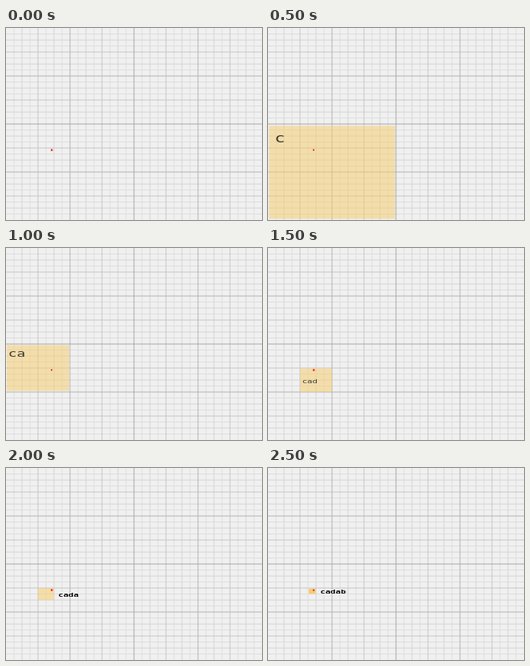
Animation, 320 px wide and 240 px high, one loop 3 s. Source, as an HTML page:

```html
<!DOCTYPE html>
<html lang="en">
<head>
<meta charset="utf-8">
<title>Geohash zoom</title>
<style>
  html, body { margin: 0; width: 100%; height: 100%; overflow: hidden; background: #f0f0f0; }
  svg { display: block; width: 100vw; height: 100vh; }
  .step {
    visibility: hidden;
    animation: show 3s step-end infinite;
    animation-delay: calc(var(--i) * .5s - 3s);
  }
  @keyframes show {
    0% { visibility: visible; }
    16.6667%, 100% { visibility: hidden; }
  }
  .cell { fill: #f7cc68; fill-opacity: .5; }
  .dot { fill: #f81c14; }
  text { font-family: "DejaVu Sans Mono", monospace; fill: #3b3a34; }
  .out { fill: #000; stroke: #fff; stroke-opacity: .6; stroke-width: 1.2; paint-order: stroke; font-weight: bold; }
</style>
</head>
<body>
<svg viewBox="0 0 320 240">
  <g id="grid" fill="none"></g>

  <g class="step" style="--i:0">
    <rect class="dot" x="56" y="151.5" width="2.4" height="2.1"/>
  </g>
  <g class="step" style="--i:1">
    <rect class="cell" x="1.3" y="122.3" width="157.5" height="116.2"/>
    <rect class="dot" x="56" y="151.6" width="2" height="1.7"/>
    <text transform="translate(8.3 143) scale(1.4 1)" font-size="15.5">c</text>
  </g>
  <g class="step" style="--i:2">
    <rect class="cell" x="1" y="121.5" width="78" height="57"/>
    <rect class="dot" x="56" y="151.6" width="2" height="1.7"/>
    <text transform="translate(2.8 136) scale(1.4 1)" font-size="12.7">ca</text>
  </g>
  <g class="step" style="--i:3">
    <rect class="cell" x="40" y="150.5" width="40" height="29.5"/>
    <rect class="dot" x="56" y="151.5" width="2.4" height="2.1"/>
    <text transform="translate(42.7 169) scale(1.4 1)" font-size="7.6">cad</text>
  </g>
  <g class="step" style="--i:4">
    <rect class="cell" x="40" y="150" width="20" height="15"/>
    <rect class="dot" x="56" y="151.5" width="2.4" height="2.1"/>
    <text class="out" transform="translate(65.3 161) scale(1.4 1)" font-size="7.6">cada</text>
  </g>
  <g class="step" style="--i:5">
    <rect class="cell" x="50.9" y="150.9" width="8.6" height="6.3" style="fill:#ffc058;fill-opacity:.8"/>
    <rect class="dot" x="56" y="151.7" width="2.2" height="2" style="fill:#d8401c"/>
    <text class="out" transform="translate(65.3 157.2) scale(1.4 1)" font-size="7.6">cadab</text>
  </g>
</svg>
<script>
  // Each level halves the spacing; coarser lines are darker and drawn last.
  const shades = ['#a8a8a8', '#b4b4b4', '#c6c6c6', '#d4d4d4', '#dedede'];
  const grid = document.getElementById('grid');
  for (let level = shades.length - 1; level >= 0; level--) {
    const count = 2 ** (level + 1);
    let d = '';
    for (let k = 1; k < count; k += 2) {
      d += `M${320 * k / count} 0V240M0 ${240 * k / count}H320`;
    }
    const path = document.createElementNS(grid.namespaceURI, 'path');
    path.setAttribute('d', d);
    path.setAttribute('stroke', shades[level]);
    grid.append(path);
  }
</script>
</body>
</html>
```
